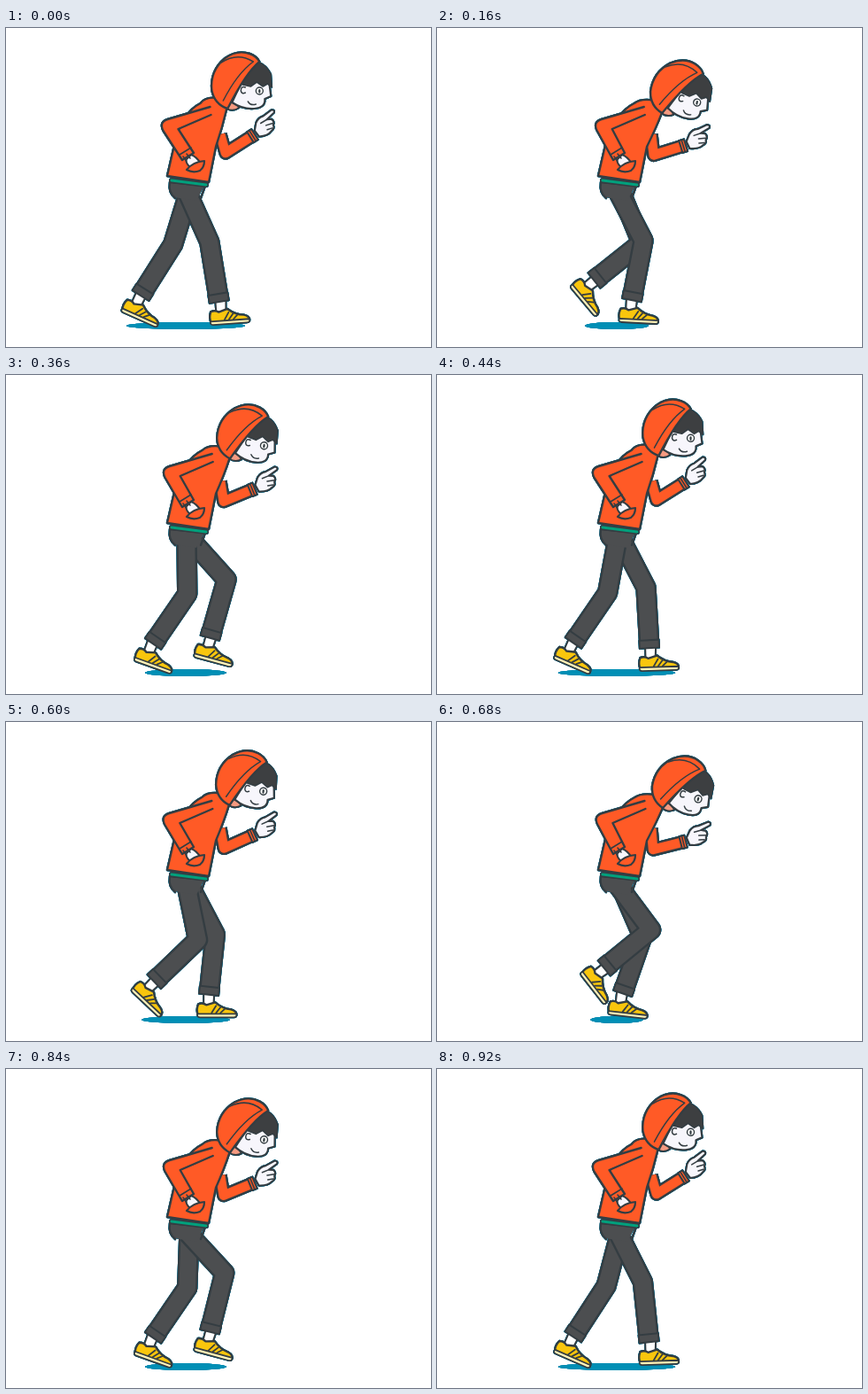
Animation, 480 px wide and 360 px high, one loop 0.96 s. Source, as an HTML page with a canvas:

```html
<!DOCTYPE html>
<html lang="en">
<head>
<meta charset="utf-8">
<title>Sneaking walk</title>
<style>
  html, body { margin: 0; width: 480px; height: 360px; overflow: hidden; background: #fff; }
  canvas { display: block; filter: drop-shadow(0 0 .5px #007fa8) drop-shadow(0 0 .5px #007fa8); }
</style>
</head>
<body>
<canvas id="stage" width="480" height="360"></canvas>
<script>
const ctx = document.getElementById('stage').getContext('2d');
const LOOP = 960, STEP = 40, TAU = 2 * Math.PI;
const THIGH = 63, SHIN = 76, HIP_Y = 184;
const INK = '#343d42', ORANGE = '#ff5a26', DENIM = '#4c4e50', YELLOW = '#f9c60d',
      SKIN = '#f7f6fc', HAIR = '#3d3f41', GREEN = '#00a07c', PINK = '#f59a80', SHADE = '#008fb5';

const mix = (a, b, u) => a + (b - a) * u;

function shape(d, fill, width = 2.4, ink = INK) {
  const path = new Path2D(d);
  if (fill) { ctx.fillStyle = fill; ctx.fill(path); }
  if (width) { ctx.lineWidth = width; ctx.strokeStyle = ink; ctx.stroke(path); }
}

function placed([x, y], angle, draw) {
  ctx.save();
  ctx.translate(x, y);
  ctx.rotate(angle);
  draw();
  ctx.restore();
}

const radians = degrees => degrees * Math.PI / 180;

// Outlined tube with round joints, closed by a folded cuff
function limb(points, width, cuff, fill) {
  const d = 'M' + points.join('L');
  ctx.lineCap = 'butt';
  shape(d, null, width + 2.4);
  shape(d, null, width - 2.4, fill);
  ctx.lineCap = 'round';
  const [[ax, ay], end] = points.slice(-2);
  const half = width / 2 + .6;
  placed(end, Math.atan2(end[1] - ay, end[0] - ax), () =>
    shape(`M${-cuff},${-half}H0V${half}H${-cuff}Z`, fill, 2));
}

// Ankle swings along a cosine and lifts on the way forward
function footAt(phase) {
  const swing = Math.max(0, phase - .5) * 2;
  const rise = Math.sin(Math.PI * swing), ahead = Math.cos(TAU * phase);
  return {
    ankle: [195 + 47 * ahead, 312.5 + 4 * ahead - 32 * rise ** 3],
    tilt: 10 - 14 * ahead + 55 * rise ** 2 * (1 - .6 * swing),
  };
}

// Two-bone reach with the knee bending forward
function kneeBetween([hx, hy], [ax, ay]) {
  const dx = ax - hx, dy = ay - hy, dist = Math.hypot(dx, dy);
  const along = (THIGH ** 2 - SHIN ** 2 + dist ** 2) / (2 * dist);
  const out = Math.sqrt(Math.max(0, THIGH ** 2 - along ** 2));
  return [hx + (dx * along + dy * out) / dist, hy + (dy * along - dx * out) / dist];
}

function shoe() {
  shape('M-5,-9L-5,6L6,6L7,-9Z', '#fff', 2);
  shape('M-11,3Q-6,1 -2,4L8,1Q16,8 26,9Q33,11 32,16L-11,16Q-14,10 -11,3Z', YELLOW);
  shape('M-12,14H32Q33,18 29,18H-9Q-13,18 -12,14Z', '#fff3b8', 1.8);
  for (const x of [9, 14, 19]) shape(`M${x},${x / 3 + 2}L${x - 5},13`, null, 1.8);
}

function leg(phase, hipX) {
  const { ankle, tilt } = footAt(phase % 1);
  const hip = [hipX, HIP_Y], knee = kneeBetween(hip, ankle);
  const cuffEnd = ankle.map((v, i) => mix(v, knee[i], .1));
  placed(ankle, radians(tilt), shoe);
  limb([hip, knee, cuffEnd], 21, 9, DENIM);
}

function pointingArm(lean) {
  const elbow = [mix(248, 244, lean), mix(141, 144, lean)];
  const wrist = [281, mix(120, 135, lean)];
  placed(wrist, radians(mix(-17, -2, lean)), () => {
    shape('M1,-4L5,-12Q9,-17 15,-17L26,-21Q30,-20 28,-17L18,-12L23,-11Q26,-7 23,-4Q24,0 19,2Q14,6 4,4Z', SKIN, 2.2);
    shape('M10,-10L18,-12M15,-6L23,-6M15,-1L21,-1', null, 1.5);
  });
  limb([[242, 120], elbow, wrist], 13, 6, ORANGE);
  placed(wrist, Math.atan2(wrist[1] - elbow[1], wrist[0] - elbow[0]), () => shape('M-3,-6V6', null, 1.6));
}

function torso(dx, dy) {
  const x = dx * .7;
  shape(`M182,167L191,128Q${200 + x},95 ${220 + x},85Q${226 + dx},${78 + dy / 2} ${240 + dx},${80 + dy / 2}` +
        `L${250 + dx},${93 + dy}Q${245 + x},112 237,134L229,174Z`, ORANGE);
  shape('M203,149Q205,157 211,158L220,153Q215,145 209,143Z', SKIN, 2);
  shape('M204,160Q211,151 224,150Q224,157 219,161Q211,164 204,160Z', ORANGE, 2.2);
  shape(`M${231 + x},89L${183 + x},103Q${173 + x},106 ${178 + x},116L199,149L212,141` +
        `L${195 + x},114L${232 + x},98`, ORANGE);
  shape('M196,143L209,135M200,145L204,150M204,142L208,147', null, 1.6);
}

// Drawn upright around the neck at 250,90
function head() {
  ctx.translate(-250, -90);
  shape('M250,86Q259,84 264,92Q257,97 250,93Z', PINK, 2);
  shape('M282,43L298,64L300,79L293,82Q294,92 281,93Q268,94 256,86L268,60Z', SKIN, 2.2);
  shape('M276,40Q292,38 300,54L301,69L296,65L291,68L284,63L277,68L268,66Z', HAIR, 1.6);
  shape('M271,69Q266,67 266,73Q267,77 271,75', null, 1.5);
  shape('M291,73a4,4 0 1 1 -8,0a4,4 0 1 1 8,0Z', '#fff', 1.4);
  shape('M287,72v2.5', null, 2.2);
  shape('M274,85Q277,90 283,88', null, 1.5);
  shape('M251,93Q236,88 233,72Q231,50 248,36Q262,26 276,31Q284,34 287,40Q272,52 251,93Z', ORANGE);
  shape('M246,84Q262,53 280,40M244,41Q262,29 280,40', null, 1.5);
}

function draw(time) {
  const phase = time / LOOP;
  // The upper body dips once per step
  const wave = .5 + .5 * Math.cos(TAU * (2 * phase - .51));
  const lean = wave * wave * (3 - 2 * wave);
  const neck = [mix(249.3, 255, lean), mix(88, 94, lean)];

  ctx.clearRect(0, 0, 480, 360);
  ctx.lineJoin = ctx.lineCap = 'round';

  ctx.fillStyle = SHADE;
  ctx.beginPath();
  ctx.ellipse(203, 336, mix(67, 29, lean), 4, 0, 0, TAU);
  ctx.fill();

  leg(phase + .5, 207);
  leg(phase, 204);
  shape('M185,174Q183,186 190,191L215,195L224,178Z', DENIM, 0);
  shape('M191,192Q183,186 185,174L225,178L220,192', null);
  shape('M187,172L226,177', null, 6);
  shape('M187,172L226,177', null, 3, GREEN);
  pointingArm(lean);
  torso(neck[0] - 250, neck[1] - 90);
  placed(neck, radians(mix(0, 15, lean)), head);
}

function tick() {
  draw(Math.floor(performance.now() % LOOP / STEP) * STEP);
  requestAnimationFrame(tick);
}
tick();
</script>
</body>
</html>
```
